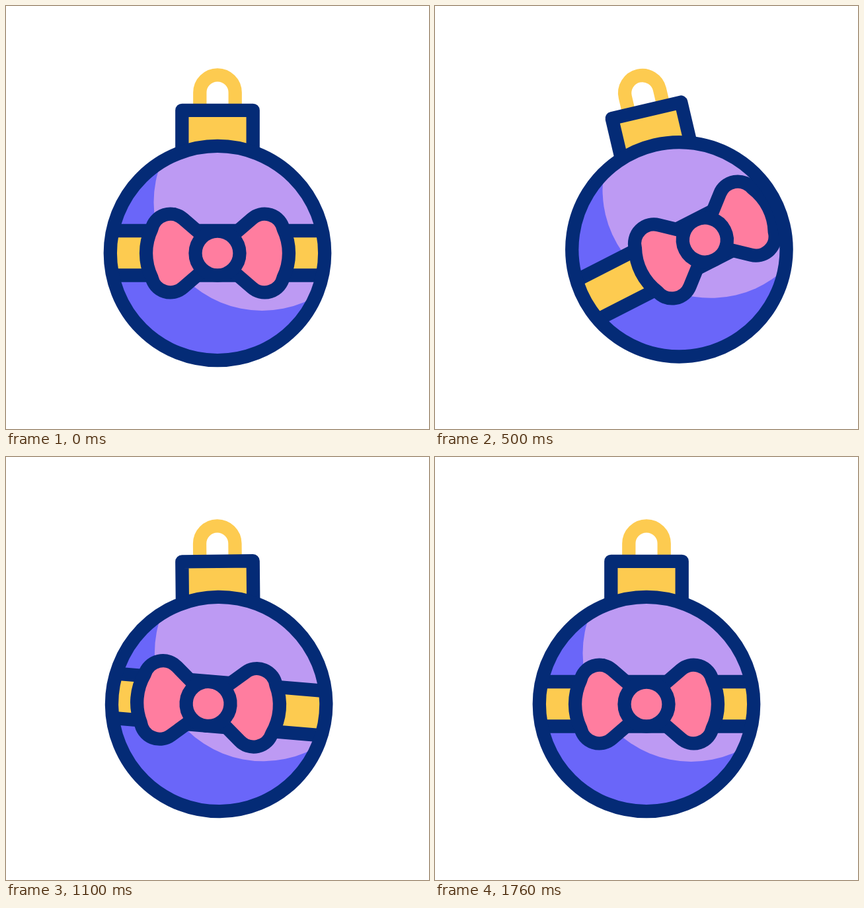
An HTML page that plays this animation: 640x640 px, repeating every 2.4 s.

```html
<!DOCTYPE html>
<html lang="en">
<head>
<meta charset="utf-8">
<title>Swinging bauble</title>
<style>
html, body { margin: 0; width: 100%; height: 100%; overflow: hidden; background: #fff; }
svg { display: block; width: 100vw; height: 100vh; }
.line { stroke: #042b76; stroke-width: 20.3; stroke-linejoin: round; }
.gold { fill: #fdcb50; }
.pink { fill: #ff7d9f; }
</style>
</head>
<body>
<svg viewBox="0 0 640 640">
  <defs>
    <clipPath id="ball"><circle cx="320" cy="374" r="165"/></clipPath>
    <path id="wing" class="line pink" d="M300 349.6L268 322A29 29 0 0 0 220.5 337A85 85 0 0 0 220.5 411A29 29 0 0 0 268 426L300 398.4Z"/>
  </defs>
  <g id="bauble">
    <path d="M293.3 158V131a26.7 26.7 0 0 1 53.4 0V158" fill="none" stroke="#fdcb50" stroke-width="20.3"/>
    <path class="line gold" d="M266.3 240V157.8H373.7V240"/>
    <g clip-path="url(#ball)">
      <circle cx="320" cy="374" r="165" fill="#6a66f9"/>
      <circle cx="387.5" cy="297" r="164" fill="#bd9af3"/>
      <g id="bow">
        <path class="line gold" d="M20 340H620V407.5H20Z"/>
        <use href="#wing"/>
        <use href="#wing" transform="translate(640) scale(-1 1)"/>
        <circle class="line pink" cx="320" cy="374" r="33.5"/>
      </g>
    </g>
    <circle class="line" cx="320" cy="374" r="162.2" fill="none"/>
  </g>
</svg>
<script>
const LOOP = 2400;
// Each key is [time in ms, angle in degrees]; the bow trails the bauble.
const baubleKeys = [[0, 0], [438, -15], [841, 12], [1250, -6], [1660, 0]];
const bowKeys = [[100, 0], [540, -14.15], [940, 11], [1350, -5.5], [1760, 0]];
const bauble = document.getElementById('bauble');
const bow = document.getElementById('bow');

function angleAt(keys, t) {
  const i = keys.findIndex(key => key[0] > t);
  if (i < 1) return 0;
  const [t0, a0] = keys[i - 1], [t1, a1] = keys[i];
  const u = (t - t0) / (t1 - t0);
  return a0 + (a1 - a0) * u * u * (3 - 2 * u);
}

function turn(part, keys, t, pivotY) {
  part.setAttribute('transform', `rotate(${angleAt(keys, t)} 320 ${pivotY})`);
}

function draw() {
  const t = performance.now() % LOOP;
  turn(bauble, baubleKeys, t, 158);
  turn(bow, bowKeys, t, 202);
  requestAnimationFrame(draw);
}
draw();
</script>
</body>
</html>
```
